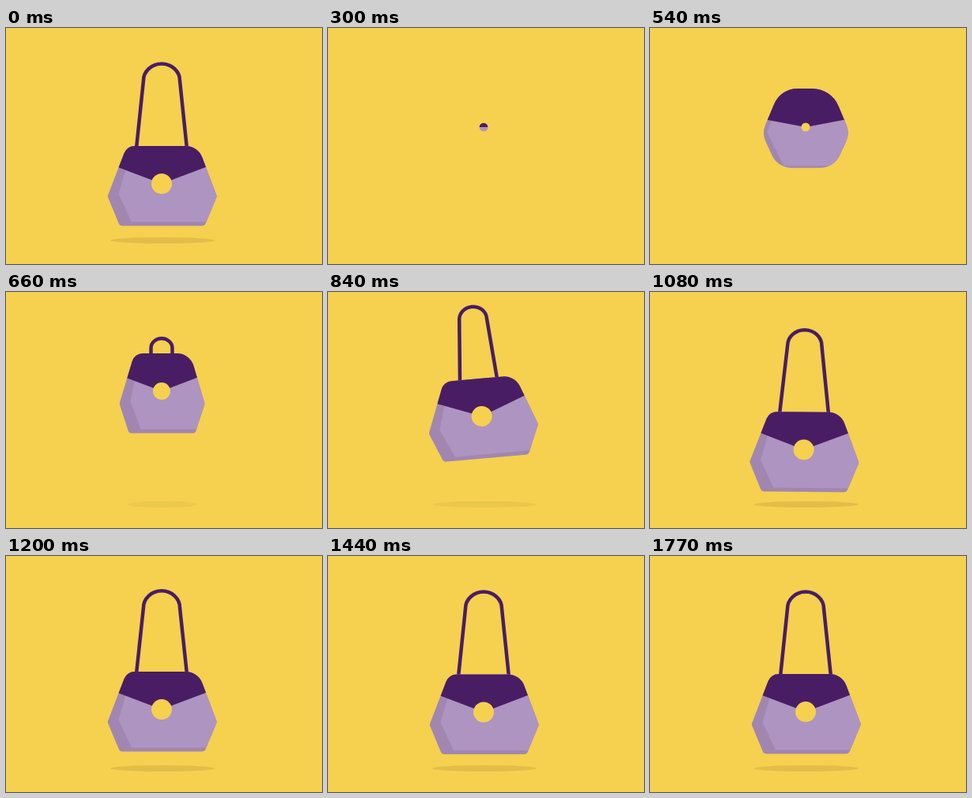
An HTML page with a canvas for the animation above (1800 ms loop, 400x300 px).

```html
<!DOCTYPE html>
<html lang="en">
<head>
<meta charset="utf-8">
<title>Handbag</title>
<style>
  html, body { margin: 0; width: 100%; height: 100%; overflow: hidden; background: #f6d04f; }
  canvas { display: block; width: 400px; height: 300px; }
</style>
</head>
<body>
<canvas id="stage" width="400" height="300"></canvas>
<script>
const ctx = document.getElementById('stage').getContext('2d');
const LOOP = 1800, STEP = 30, POP = 300;
const YELLOW = '#f6d04f', DARK = '#491d63', LILAC = '#ae94c1', SHADE = '#a187b0';

// Bag corners relative to the clasp, clockwise from top left.
const BAG = [[-44, -48], [46, -48], [70, 16], [54.5, 53.5], [-53, 53.5], [-68.5, 16]];
const RADII = [14, 22, 4, 4, 4, 4];

const lerp = (a, b, k) => a + (b - a) * k;
const progress = (t, from, to) => Math.min(1, Math.max(0, (t - from) / (to - from)));
const smooth = u => u * u * (3 - 2 * u);
const easeOut = (u, power) => 1 - (1 - u) ** power;
const easeOutBack = u => 1 + 2.7 * (u - 1) ** 3 + 1.7 * (u - 1) ** 2;
const decay = ms => Math.exp(-0.0063 * ms);

function fillPoly(points, color) {
  ctx.beginPath();
  points.forEach(p => ctx.lineTo(...p));
  ctx.fillStyle = color;
  ctx.fill();
}

function fillEllipse(x, y, rx, ry, color) {
  ctx.beginPath();
  ctx.ellipse(x, y, rx, ry, 0, 0, Math.PI * 2);
  ctx.fillStyle = color;
  ctx.fill();
}

function drawShadow(t) {
  const alpha = lerp(0.04, 0.085, smooth(progress(t, 800, 1060)));
  fillEllipse(198, 270, 66 * easeOut(progress(t, 570, 810), 2.4), 4, `rgba(0,0,0,${alpha})`);
}

function drawHandle(t) {
  const rise = 545, peak = 950;
  if (t <= rise) return;
  const ms = t - peak;
  const height = ms < 0
    ? lerp(44, 161, smooth(progress(t, rise, peak)))
    : 152.5 + 8.5 * decay(ms) * Math.cos(Math.PI * ms / 250);
  const spread = progress(t, 660, 1200);
  const base = lerp(13.5, 32.3, easeOut(spread, 2));
  const arch = lerp(13.5, 23, easeOut(spread, 1.3));
  const archHeight = arch * 0.92;
  ctx.beginPath();
  ctx.moveTo(-base, -42);
  ctx.ellipse(0, archHeight - height, arch, archHeight, 0, Math.PI, 0);
  ctx.lineTo(base, -42);
  ctx.strokeStyle = DARK;
  ctx.lineWidth = 4.5;
  ctx.stroke();
}

function drawBody(t) {
  const r = lerp(5.3, 50, easeOut(progress(t, POP, 540), 2));
  const morph = smooth(progress(t, 440, 640));
  const widen = easeOutBack(progress(t, 660, 860));
  const width = lerp(0.78, 1, widen);

  // A hexagon around the circle: rounding its corners by r gives the circle itself.
  const s = r / Math.sqrt(3);
  const hexagon = [[-s, -r], [s, -r], [2 * s, 0], [s, r], [-s, r], [-2 * s, 0]];
  const outline = BAG.map(([x, y], i) =>
    [lerp(hexagon[i][0], x * width, morph), lerp(hexagon[i][1], y, morph)]);
  const [topLeft, topRight, , , bottomLeft, left] = outline;
  const floor = bottomLeft[1] - 5 * morph;
  const flap = -38 * morph;

  ctx.save();
  ctx.beginPath();
  ctx.moveTo((topLeft[0] + topRight[0]) / 2, topLeft[1]);
  for (let i = 1; i <= 6; i++) {
    const corner = i % 6;
    ctx.arcTo(...outline[corner], ...outline[(corner + 1) % 6], lerp(r, RADII[corner], morph));
  }
  ctx.closePath();
  ctx.clip();
  ctx.fillStyle = SHADE;
  ctx.fillRect(-100, -100, 200, 200);
  fillPoly([
    [topLeft[0] + 7 * morph, topLeft[1]],
    [left[0] + 14 * morph, left[1] - 3 * morph],
    [bottomLeft[0] + 15 * morph, floor],
    [100, floor], [100, topLeft[1]]
  ], LILAC);
  fillPoly([[-100, -100], [100, -100], [100, flap], [0, 0], [-100, flap]], DARK);
  ctx.restore();

  const clasp = lerp(11, 13, widen) * morph;
  fillEllipse(0, 0, clasp, clasp, YELLOW);
}

// The bag hangs, drops, then bounces around its resting height.
function bagHeight(t) {
  const ms = t - 915;
  return ms < 0
    ? lerp(126, 198, progress(t, 690, 915) ** 2)
    : 198 + 17.6 * decay(ms) * Math.sin(Math.PI * ms / 190);
}

function bagAngle(t) {
  const swing = progress(t, 690, 1200);
  return -12 * Math.sin(Math.PI * 2.28 * swing) * (1 - swing) ** 2;
}

function draw(t) {
  ctx.fillStyle = YELLOW;
  ctx.fillRect(0, 0, 400, 300);
  drawShadow(t);
  const drift = Math.sin(Math.PI * progress(t, 720, 1200)) ** 2;
  ctx.save();
  ctx.translate(197 - 4.7 * drift, bagHeight(t));
  ctx.rotate(bagAngle(t) * Math.PI / 180);
  drawHandle(t);
  drawBody(t);
  ctx.restore();
}

function frame() {
  const t = Math.floor(performance.now() % LOOP / STEP) * STEP;
  draw(t < POP ? LOOP : t);
  requestAnimationFrame(frame);
}
frame();
</script>
</body>
</html>
```
